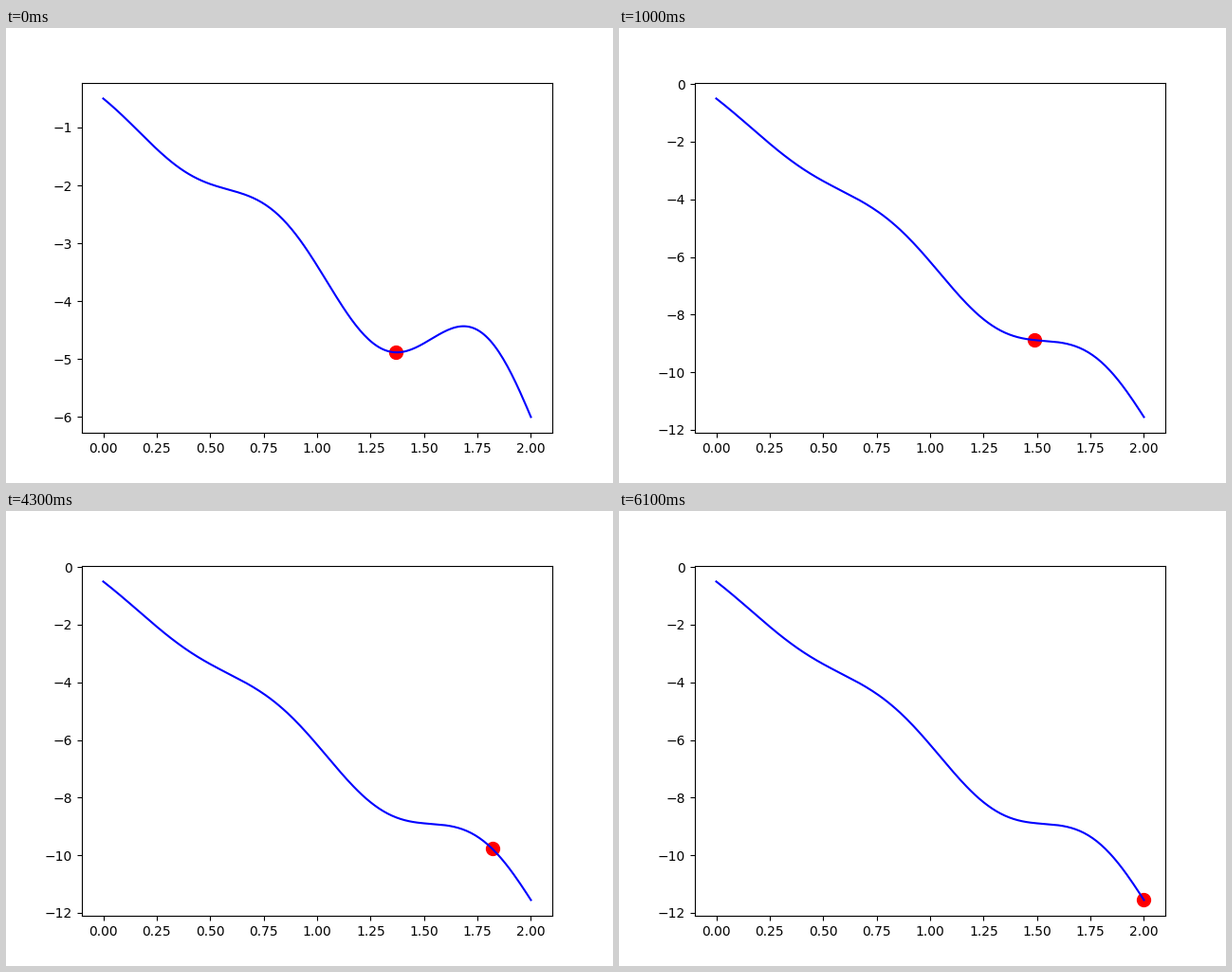
Recreate the animation shown at these times as a matplotlib script. Size 640 by 480 pixels, loop 6.2 s.

```python
import numpy as np
import matplotlib.pyplot as plt
from matplotlib.animation import FuncAnimation

STEP = 5 / 9                             # tilt added per stage
REST = [1.37, 1.40, 1.42, 1.46, 1.49]    # resting place of the ball per stage
FRAMES = 62
ROLL_START = 2 * len(REST)

x = np.linspace(0, 2, 201)
fig, ax = plt.subplots(figsize=(6.4, 4.8), dpi=100)


def potential(pos, stage):
    """Rippled slope, tilted further at every stage."""
    base = -0.5 - 3.02 * pos + 0.135 * pos**2
    return base - 0.5 * pos * np.sin(2 * np.pi * pos) - stage * STEP * pos


def draw_stage(stage, ball, width=1.5):
    # The line goes first: the ball's extent then widens the automatic limits.
    ax.plot(x, potential(x, stage), color="blue", lw=width)
    ax.scatter([ball], [potential(ball, stage)], s=100, color="red")


def update(i):
    ax.clear()
    if i >= ROLL_START:
        draw_stage(len(REST), REST[-1] + 0.01 * (i - ROLL_START))
        return
    # Each stage is shown alone, then together with all earlier ones.
    stage, together = divmod(i, 2)
    if together:
        for k in range(stage + 1):
            draw_stage(k, REST[k], width=1.75)
        ax.set_ylim(-12, 0)
    else:
        draw_stage(stage, REST[stage])


anim = FuncAnimation(fig, update, frames=FRAMES, interval=100,
                     repeat=True, repeat_delay=0)
plt.show()
```
